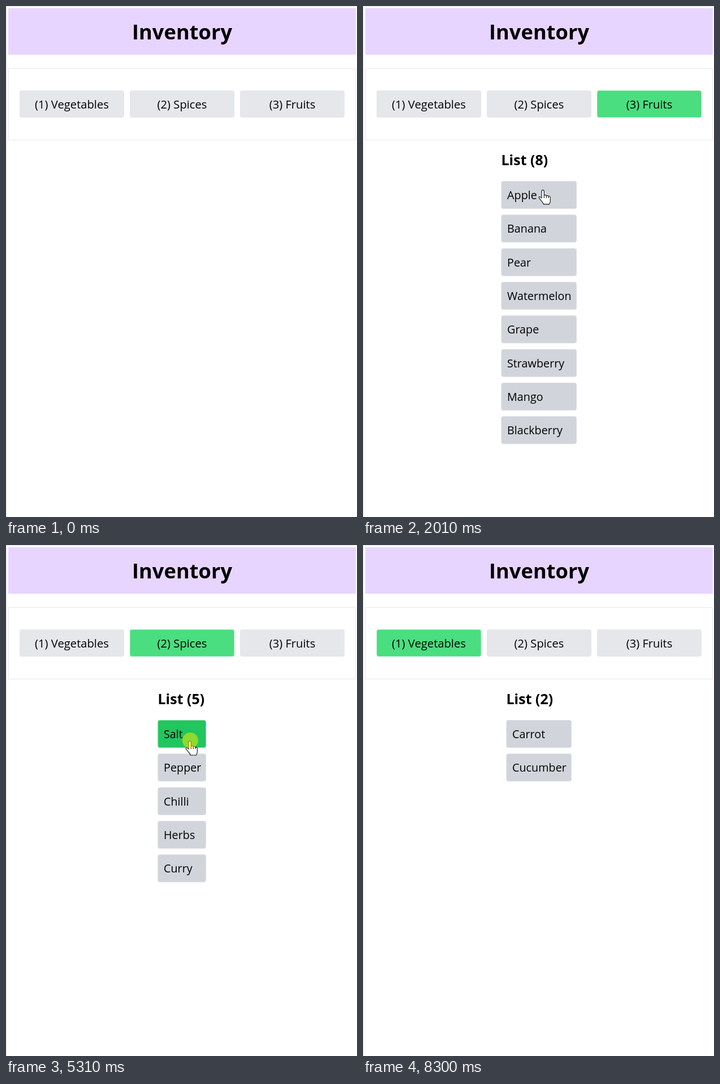
An HTML page with a canvas that plays this animation: 621x902 px, repeating every 9.3 s.

```html
<!DOCTYPE html>
<html lang="en">
<head>
<meta charset="utf-8">
<title>Inventory</title>
<style>
html, body { margin: 0; width: 100%; height: 100%; overflow: hidden; background: #fff; }
canvas { display: block; }
</style>
</head>
<body>
<canvas width="621" height="902"></canvas>
<script>
const ctx = document.querySelector('canvas').getContext('2d');
const LOOP = 9300, ENTER = 70, LEAVE = 8290;
const SETTLE = 60, PRESS = 150, REACT = 70, SELECT = 140;
const TAB = { y: 149, w: 185, h: 48 }, ITEM_H = 49;

const tabs = [
  { name: 'Vegetables', x: 253.5, w: 115.5, items: ['Carrot', 'Cucumber'] },
  { name: 'Spices', x: 268.5, w: 85.5, items: ['Salt', 'Pepper', 'Chilli', 'Herbs', 'Curry'] },
  { name: 'Fruits', x: 244.5, w: 133.5, items: ['Apple', 'Banana', 'Pear', 'Watermelon',
    'Grape', 'Strawberry', 'Mango', 'Blackberry'] }
];

const tabX = i => 24 + i * 195;
const itemY = i => 309 + i * 59.33;

// The pointer glides from stop to stop and presses whatever button lies there.
const stops = [], choices = [];
const visit = (t, x, y) => stops.push({ t, x, y });
const visitTab = (t, tab, dx, dy = 28) => {
  visit(t, tabX(tab) + dx, TAB.y + dy);
  choices.push({ t: t + SELECT, tab });
};
const visitItem = (t, i, x, dy) => visit(t, x, itemY(i) + dy);

visitTab(300, 0, 116);
visitTab(1030, 1, 71);
visitTab(1500, 2, 44);
[0, 1, 2, 2, 1, 0].forEach((item, i) => visitItem(2090 + i * 290, item, 317, 17));
visitTab(4080, 1, 127, 16);
visitItem(5220, 0, 325, 37);
visitTab(5860, 0, 137);
visitItem(6190, 0, 317, 30);
visitItem(6940, 1, 317, 30);
visit(7670, 549, 21);
visit(LEAVE + SETTLE, 290, 901);

const hand = new Path2D('M-2 2a2.2 2 0 0 1 4.4 0v7q3-1 4 1 3-1 4 1 3-.6 3 2v6q0 3-2 6h-10' +
  'q-1-3-4-6l-4-5q-1-3 2-2l2.6 2z');
const knuckles = new Path2D('M2.4 9v5M6.4 10v4M10.2 11v3');
const arrow = new Path2D('M0 0v18l4.2-4 2.8 6.4 2.8-1.2-2.8-6.2h5.8z');

const inside = (p, x, y, w, h) => p && p.x >= x && p.x <= x + w && p.y >= y && p.y <= y + h;

function pointerAt(t) {
  if (t < ENTER || t >= LEAVE) return null;
  const i = stops.findIndex(s => s.t > t);
  const to = stops[i], from = stops[i - 1] || to;
  const begin = from.t + PRESS, end = to.t - SETTLE;
  const u = Math.min(1, Math.max(0, (t - begin) / (end - begin)));
  const e = u * u * (3 - 2 * u);
  return { x: from.x + (to.x - from.x) * e, y: from.y + (to.y - from.y) * e };
}

function text(str, x, y, size, weight = 400, align = 'left') {
  ctx.font = `${weight} ${size}px "Open Sans", "Noto Sans", sans-serif`;
  ctx.textAlign = align;
  ctx.fillStyle = '#000';
  ctx.fillText(str, x, y);
}

function box(x, y, w, h, fill) {
  ctx.beginPath();
  ctx.roundRect(x, y, w, h, 4);
  ctx.fillStyle = fill;
  ctx.fill();
  ctx.beginPath();
  ctx.roundRect(x + .5, y + .5, w - 1, h - 1, 4);
  ctx.strokeStyle = 'rgba(229,231,235,.4)';
  ctx.stroke();
}

function drawPointer(p, isHand) {
  ctx.save();
  ctx.translate(p.x, p.y);
  ctx.fillStyle = '#fff';
  ctx.strokeStyle = '#111';
  ctx.lineWidth = 1.1;
  const shape = isHand ? hand : arrow;
  ctx.fill(shape);
  ctx.stroke(shape);
  if (isHand) ctx.stroke(knuckles);
  ctx.restore();
}

function drawPage() {
  ctx.lineWidth = 1;
  ctx.fillStyle = '#fff';
  ctx.fillRect(0, 0, 621, 902);
  ctx.fillStyle = '#e0e0e2';
  ctx.fillRect(0, 0, 621, 1);
  ctx.fillRect(0, 0, 1, 902);
  ctx.fillStyle = '#e8d5ff';
  ctx.fillRect(4, 4, 615, 82);
  text('Inventory', 311.5, 58.5, 36.3, 700, 'center');
  ctx.strokeStyle = '#e5e7eb';
  ctx.strokeRect(4.5, 110.5, 614, 126);
}

function draw(t) {
  const p = pointerAt(t);
  const stop = stops.find(s => t >= s.t && t < s.t + PRESS);
  const pressed = stop && t >= stop.t + REACT;
  const chosen = choices.findLast(c => t >= c.t);
  let overButton = false;

  drawPage();
  tabs.forEach((tab, i) => {
    const x = tabX(i);
    box(x, TAB.y, TAB.w, TAB.h, chosen?.tab === i ? '#4ade80' : '#e5e7eb');
    text(`(${i + 1}) ${tab.name}`, x + TAB.w / 2, 181, 20.2, 400, 'center');
    overButton ||= inside(p, x, TAB.y, TAB.w, TAB.h);
  });

  if (chosen) {
    const { x, w, items } = tabs[chosen.tab];
    text(`List (${items.length})`, x, 281, 25, 700);
    items.forEach((item, i) => {
      const y = itemY(i), over = inside(p, x, y, w, ITEM_H);
      box(x, y, w, ITEM_H, over && pressed ? '#22c55e' : '#d1d5db');
      text(item, x + 10.5, y + 32, 19.8);
      overButton ||= over;
    });
  }

  if (!p) return;
  drawPointer(p, overButton);
  if (stop && overButton) {
    ctx.beginPath();
    ctx.arc(p.x + 1, p.y - 1, 14, 0, 7);
    ctx.fillStyle = 'rgba(250,240,0,.5)';
    ctx.fill();
  }
}

const start = performance.now();
function tick() {
  draw((performance.now() - start) % LOOP);
  requestAnimationFrame(tick);
}
tick();
</script>
</body>
</html>
```
